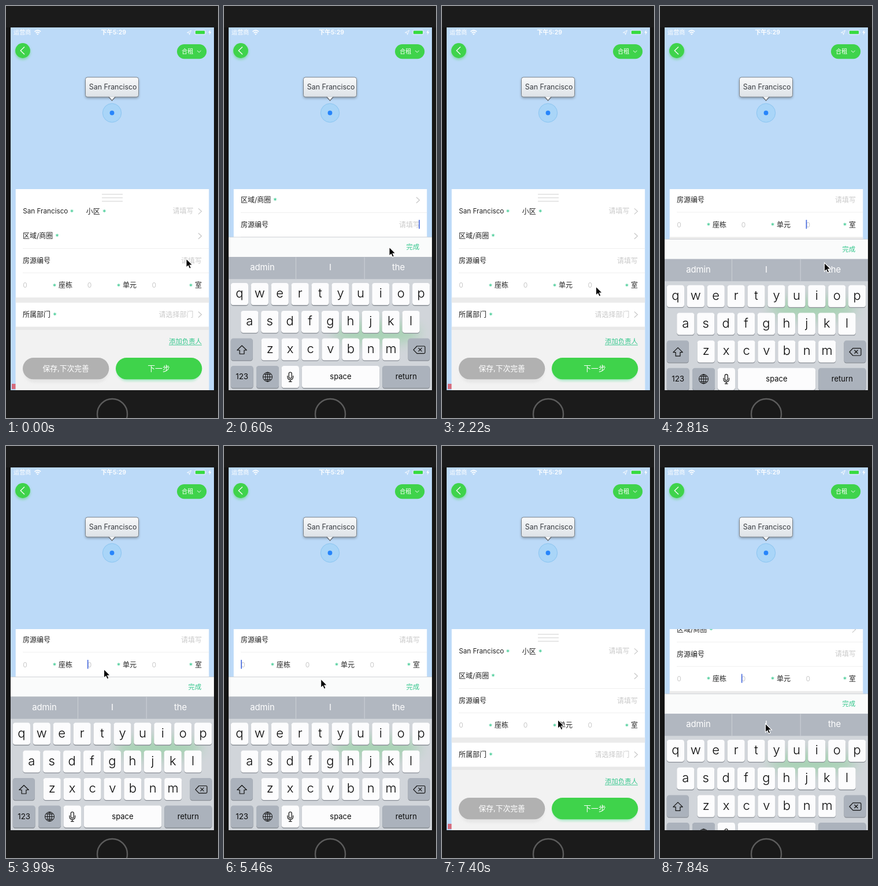
These frames come from a looping animation (367x711 px, 7.99 s). An HTML page:

```html
<!DOCTYPE html>
<html lang="zh-CN">
<head>
<meta charset="utf-8">
<title>Form keyboard</title>
<style>
html, body { margin: 0; width: 100%; height: 100%; overflow: hidden; background: #1b1b1b; }
svg { display: block; width: 367px; height: 711px; }
text { font-family: Inter, "Noto Sans CJK SC", "Noto Sans CJK", sans-serif; white-space: pre; }
</style>
</head>
<body>
<svg id="stage" viewBox="0 0 367 711"></svg>
<script>
const LOOP = 7990;
const INK = '#222', HINT = '#cacaca', GREEN = '#3fd34b', TEAL = '#35c78d';

const rect = (x, y, w, h, fill, r = 0, more = '') =>
  `<rect x="${x}" y="${y}" width="${w}" height="${h}" rx="${r}" fill="${fill}" ${more}/>`;
const text = (s, x, y, size, fill, anchor = 'start', more = '') =>
  `<text x="${x}" y="${y}" font-size="${size}" fill="${fill}" text-anchor="${anchor}" ${more}>${s}</text>`;
const line = (d, stroke, w = 1, more = '') =>
  `<path d="${d}" fill="none" stroke="${stroke}" stroke-width="${w}" ${more}/>`;
const star = (x, y) => text('*', x, y + 2, 13, TEAL, 'middle');
const chevron = y => line(`M333 ${y - 5}l5.5 5l-5.5 5`, '#c4c4c4', 1.1);

function device() {
  return rect(0, 0, 367, 711, '#1b1b1b')
    + rect(0, 37, 8, 626, '#141414') + rect(360, 37, 7, 626, '#161616')
    + '<circle cx="184" cy="704" r="26" fill="#191919" stroke="#5c5c5c" stroke-width="2.4"/>';
}

function statusBar() {
  return text('运营商', 13, 49.3, 10.2, '#fff')
    + line('M49.5 44.2q5.3-4.8 10.6 0M51.6 46.6q3.2-2.8 6.4 0', '#fff', 1.6)
    + '<path d="M53 48.2q1.8-1.5 3.6 0l-1.8 1.9z" fill="#fff"/>'
    + text('下午5:29', 186, 49.3, 10.4, '#fff', 'middle', 'font-weight="600"')
    + line('M313.5 46l7-4l-3 7.5l-.6-3.4z', '#fff', .8)
    + rect(326.7, 41.5, 18.6, 8, 'none', 2, 'stroke="#fff" stroke-opacity=".7" stroke-width=".7"')
    + rect(328, 42.7, 16, 5.6, '#37dc3d', 1)
    + '<path d="M346.2 44v3q1.2-1.5 0-3zM353.7 41l-3.3 5h2.2l-.8 4l3.6-5.2h-2.3z" fill="#fff"/>';
}

function mapLayer() {
  return rect(8, 37, 352, 626, '#bcdaf8') + statusBar()
    + `<circle cx="29" cy="79.5" r="13" fill="${GREEN}" opacity=".45" filter="url(#soft)"/>`
    + `<circle cx="29" cy="77" r="12.9" fill="${GREEN}"/>`
    + line('M32 70.5l-6.8 6.5l6.8 6.5', '#fff', 1.2)
    + rect(296, 66, 51.2, 25.2, GREEN, 12.6)
    + text('合租', 304, 82.2, 10.2, '#fff')
    + line('M331 77l3.3 3l3.3-3', '#fff', .9)
    + '<circle cx="183.5" cy="184.5" r="16.2" fill="#a9d5f8" stroke="#8bc5f1"/>'
    + '<circle cx="183.5" cy="184.5" r="3.9" fill="#2785fb"/>'
    + rect(137.5, 125, 92, 34, '#222', 4, 'opacity=".4" filter="url(#soft)"')
    + rect(137.5, 123, 92, 34, 'url(#callout)', 3.5, 'stroke="#777d84" stroke-width=".9"')
    + '<path d="M177 157.3h13l-6.5 7z" fill="#6b7076"/><path d="M178.6 156.6h9.8l-4.9 5.6z" fill="#f4f6f8"/>'
    + text('San Francisco', 185.2, 143.8, 12.4, '#3b3e42', 'middle')
    + rect(10, 652, 7, 9, '#d56b7c');
}

function form() {
  const rule = y => rect(29, y, 322.5, .8, '#ececec');
  const unit = (x, starX, labelX, label) =>
    text('0', x, 486.2, 12, HINT) + star(starX, 486.5) + text(label, labelX, 486.4, 12, INK);
  return rect(16.5, 316, 335, 460, '#fff')
    + [325, 331, 337].map(y => rect(166, y - .7, 36, 1.3, '#dadada')).join('')
    + text('San Francisco', 29.3, 358.4, 11.7, INK) + star(114, 358.5)
    + text('小区', 138.7, 358.5, 12, INK) + star(170.3, 358.5)
    + text('请填写', 324.5, 358.2, 12, HINT, 'end') + chevron(354.3)
    + text('区域/商圈', 29, 401.2, 12, INK) + star(88.5, 401.3) + chevron(397)
    + rule(418)
    + text('房源编号', 29, 443.8, 12, INK) + text('请填写', 339, 443.5, 12, HINT, 'end')
    + rule(460)
    + unit(29.2, 84, 91, '座栋') + unit(140.8, 195, 202, '单元') + unit(252.4, 320, 327, '室')
    + rect(16.5, 503, 335, 9, '#ebebeb')
    + text('所属部门', 29, 536.9, 12, INK) + star(84.5, 537)
    + text('请选择部门', 324.5, 536.7, 12, HINT, 'end') + chevron(532.5)
    + rect(16.5, 553.5, 335, 6, '#e8e8e8') + rect(16.5, 559, 335, 220, '#f2f2f2')
    + text('添加负责人', 339, 583.2, 11.4, TEAL, 'end') + rect(282, 584.6, 57, .9, TEAL)
    + rect(31, 612, 146, 38, '#dedede', 19, 'filter="url(#soft)" opacity=".6"')
    + rect(29, 607, 149.3, 37.3, '#b1b1b1', 18.6)
    + text('保存,下次完善', 103.7, 630.4, 12.8, '#fff', 'middle')
    + rect(192, 612, 145, 35, '#7fe2ae', 18, 'filter="url(#soft)" opacity=".65"')
    + rect(190, 607, 149.3, 37.3, GREEN, 18.6)
    + text('下一步', 264.5, 630.4, 12.8, '#fff', 'middle');
}

function key(x, y, w, label, size, special) {
  const mid = x + w / 2;
  return rect(x, y + 1, w, 38.3, '#8a8f96', 4.2)
    + rect(x, y, w, 38, special ? '#abb2bc' : '#fcfcfd', 4.2)
    + (label ? text(label, mid, y + (size > 18 ? 25.2 : 23), size, '#0a0a0a', 'middle',
        size > 18 ? 'font-weight="300"' : '') : '');
}

function keyboard() {
  const rows = ['qwertyuiop', 'asdfghjkl', 'zxcvbnm'], left = [11.8, 29.2, 64.6], top = [477.6, 525.4, 573];
  const letters = rows.map((row, r) => [...row].map((c, i) =>
    key(left[r] + i * 34.92, top[r], 30.2, c, 22)).join('')).join('');
  const black = (d, w = 1.2) => line(d, '#111', w, 'stroke-linejoin="round"');
  return rect(8, 398.5, 352, 34.5, '#fafbfb') + rect(8, 398, 352, .8, '#c9ccd0')
    + text('完成', 315.6, 419.6, 11.3, TEAL)
    + rect(8, 432.5, 352, 232, '#d1d5da')
    + '<g clip-path="url(#keys)"><ellipse id="tint" cx="264" rx="76" ry="20" fill="#72cf83" opacity=".42" filter="url(#blur)"/></g>'
    + rect(8, 432.5, 352, 38.3, '#b1b7c0')
    + rect(124, 433, .9, 37.5, '#d0d4d9') + rect(242.7, 433, .9, 37.5, '#d0d4d9')
    + [['admin', 66.5], ['I', 184], ['the', 302]].map(([s, x]) => text(s, x, 455.8, 14.8, '#fff', 'middle')).join('')
    + letters
    + key(11.8, 573, 38, '', 0, 1) + key(318.5, 573, 38, '', 0, 1)
    + key(11.8, 620.6, 38.8, '123', 13.4, 1) + key(56, 620.6, 39, '', 0, 1)
    + key(99.7, 620.6, 30.3, '', 0) + key(134.8, 620.6, 134.4, 'space', 13, 0)
    + key(274.2, 620.6, 82.3, 'return', 13, 1)
    + black('M31 585.5l8.2 8h-4.3v6.5h-7.8v-6.5h-4.3z')
    + black('M334 586.5h12.2q1.8 0 1.8 1.8v9q0 1.8-1.8 1.8h-12.2l-6-6.3zM336.5 589.6l6 6m0-6l-6 6')
    + '<g fill="none" stroke="#111"><circle cx="75.5" cy="639.6" r="8"/><ellipse cx="75.5" cy="639.6" rx="3.8" ry="8"/></g>'
    + black('M75.5 631.6v16M67.5 639.6h16M69.2 635h12.6M69.2 644.2h12.6', 1)
    + rect(112.3, 631.5, 5, 10.5, 'none', 2.5, 'stroke="#111" stroke-width="1.2"')
    + black('M110 637.5v2q0 5 4.8 5t4.8-5v-2M114.8 644.5v3.2M112 647.8h5.6');
}

const clip = (id, x, y, w, h) => `<clipPath id="${id}">${rect(x, y, w, h, '#000')}</clipPath>`;
const blur = (id, n) => `<filter id="${id}" x="-50%" y="-100%" width="200%" height="300%"><feGaussianBlur stdDeviation="${n}"/></filter>`;

document.getElementById('stage').innerHTML = `<defs>
  ${clip('screen', 8, 37, 352, 626)}${clip('sheet', 16.5, 316, 335, 347)}${clip('keys', 8, 471, 352, 194)}
  ${blur('soft', 2.2)}${blur('blur', 10)}
  <linearGradient id="callout" x2="0" y2="1"><stop stop-color="#f8f9fa"/><stop offset="1" stop-color="#dde2e7"/></linearGradient>
  </defs>${device()}
  <g clip-path="url(#screen)">${mapLayer()}
    <g clip-path="url(#sheet)"><g id="form">${form()}${rect(0, 0, 1.7, 15.5, '#4a6de0', .6, 'id="caret"')}</g></g>
    <g id="board">${keyboard()}</g>
  </g>
  <path id="pointer" d="M0 0v15.2l3.4-3.1l2.3 5.2l2.7-1.2l-2.3-5.1h4.9z" fill="#000" stroke="#fff" stroke-width="1.1"/>`;

const [formEl, caret, board, tint, pointer] =
  ['form', 'caret', 'board', 'tint', 'pointer'].map(id => document.getElementById(id));

// Taps: time, keyboard up, form scroll, caret x, caret y
const taps = [
  [135, 1, 62, 337.2, 431],
  [1300, 0, 0],
  [2476, 1, 104.5, 252.6, 473.5],
  [3820, 1, 104.5, 140.8, 473.5],
  [5020, 1, 104.5, 29.2, 473.5],
  [6890, 0, 0],
  [7635, 1, 104.5, 140.8, 473.5]
];

// Pointer: time, x, y
const path = [
  [0, 312, 436], [200, 312, 436], [600, 286, 416], [1150, 322, 417], [1400, 322, 417],
  [2150, 266.5, 484], [2540, 266.5, 484], [2810, 284.5, 443], [3500, 169.5, 385], [4000, 169.5, 385],
  [4800, 72, 383], [5080, 72, 383], [6020, 338, 436], [6180, 338, 436], [6480, 353, 430],
  [6660, 353, 430], [6800, 327.5, 426], [6980, 327.5, 426], [7520, 182.5, 479], [LOOP, 182.5, 479]
];

const smooth = p => { p = Math.min(1, Math.max(0, p)); return p * p * (3 - 2 * p); };
const spring = ms => { const x = ms * .01826; return 1 - (1 + x) * Math.exp(-x); };

function draw(t) {
  let up = 0, scroll = 0, field = null;
  for (const tap of taps) {
    const age = t - tap[0];
    if (age < 0) break;
    up += (tap[1] - up) * spring(age);
    scroll += (tap[2] - scroll) * smooth(age / 300);
    field = tap;
  }
  formEl.setAttribute('transform', `translate(0 ${-scroll})`);
  const drop = (1 - up) * 266;
  board.setAttribute('transform', `translate(0 ${drop})`);
  tint.setAttribute('cy', 626 - scroll - drop);

  const beat = field ? (t - field[0]) % 1000 : 0;
  const shown = field && field[1] && (beat < 475 || beat > 750);
  caret.setAttribute('visibility', shown ? 'visible' : 'hidden');
  if (shown) {
    caret.setAttribute('x', field[3]);
    caret.setAttribute('y', field[4]);
  }

  const i = Math.max(1, path.findIndex(k => k[0] >= t));
  const [t0, x0, y0] = path[i - 1], [t1, x1, y1] = path[i];
  const p = smooth((t - t0) / (t1 - t0));
  pointer.setAttribute('transform', `translate(${x0 + (x1 - x0) * p} ${y0 + (y1 - y0) * p})`);
}

const start = performance.now();
function tick() {
  draw((performance.now() - start) % LOOP);
  requestAnimationFrame(tick);
}
tick();
</script>
</body>
</html>
```
